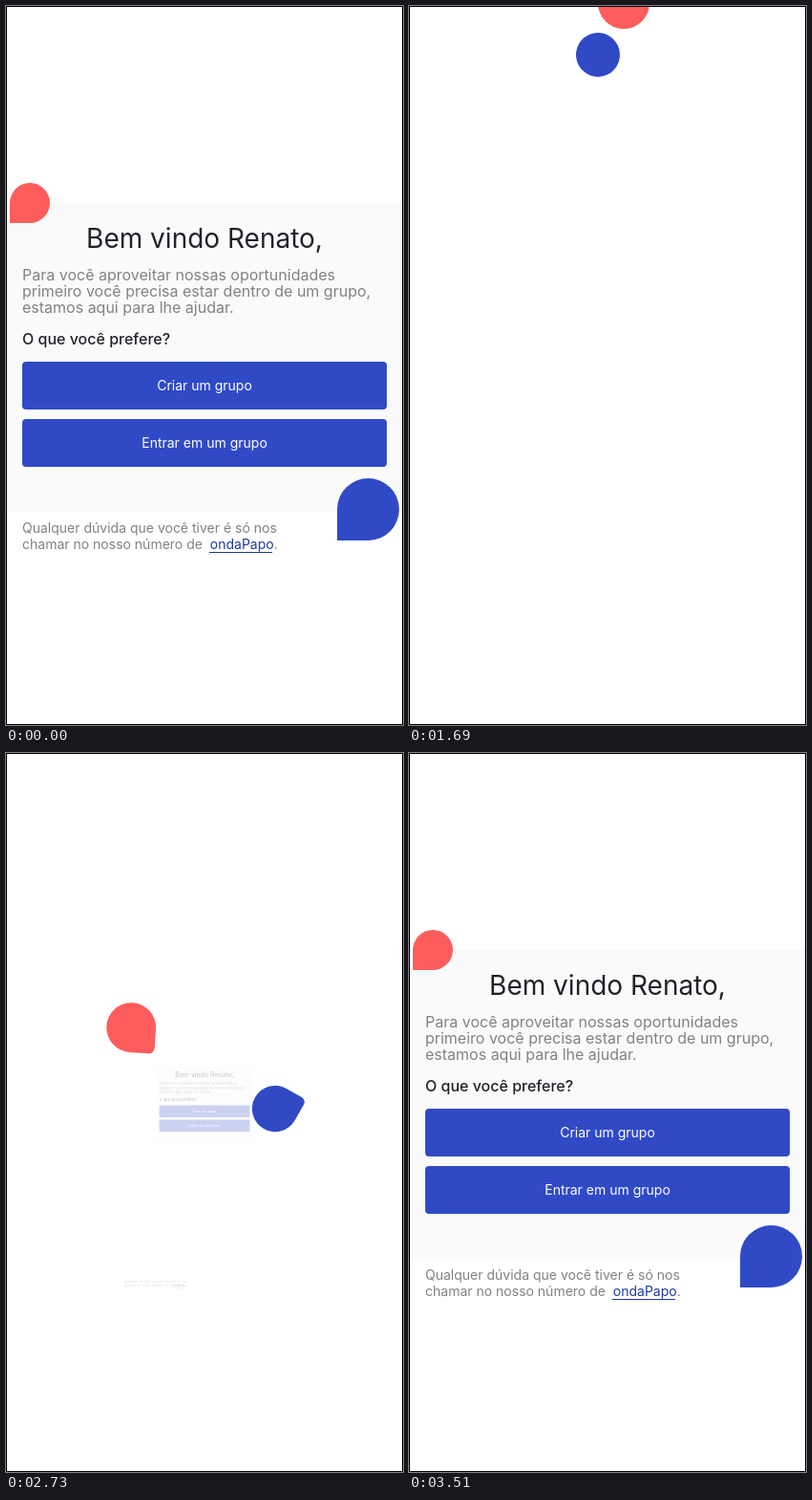
Write an HTML page that moves like this. It is 416 px wide and 752 px high and loops after 3.77 s.

```html
<!DOCTYPE html>
<html lang="pt-BR">
<head>
<meta charset="utf-8">
<title>Boas-vindas</title>
<style>
  html, body { margin: 0; width: 100%; height: 100%; overflow: hidden; background: #fff; }
  svg { display: block; width: 100vw; height: 100vh; }
  text { font: 400 16px Inter, Roboto, sans-serif; fill: #828282; }
  .title { font-size: 28px; fill: #232129; text-anchor: middle; }
  .ask { font-weight: 500; fill: #232129; }
  .label { font-size: 14px; fill: #fff; text-anchor: middle; }
  .note { font-size: 14px; }
  .link { fill: #1c3a9e; }
  .blue { fill: #304ac6; }
  .red { fill: #fd5d5c; }
</style>
</head>
<body>
<svg viewBox="0 0 416 752">
  <g id="card">
    <rect x="1" y="206" width="414" height="323" fill="#fafafa"/>
    <text class="title" x="208" y="253">Bem vindo Renato,</text>
    <text x="17" y="287">Para você aproveitar nossas oportunidades</text>
    <text x="17" y="304">primeiro você precisa estar dentro de um grupo,</text>
    <text x="17" y="321">estamos aqui para lhe ajudar.</text>
    <text class="ask" x="17" y="354">O que você prefere?</text>
    <rect class="blue" x="17" y="372" width="382" height="50" rx="4"/>
    <rect class="blue" x="17" y="432" width="382" height="50" rx="4"/>
    <text class="label" x="208" y="402">Criar um grupo</text>
    <text class="label" x="208" y="462">Entrar em um grupo</text>
  </g>
  <g id="note">
    <text class="note" x="17" y="551">Qualquer dúvida que você tiver é só nos</text>
    <text class="note" x="17" y="568">chamar no nosso número de&nbsp;&nbsp;<tspan class="link">ondaPapo</tspan>.</text>
    <rect class="link" x="213" y="571" width="66" height="1"/>
  </g>
  <path id="red" class="red"/>
  <path id="blue" class="blue"/>
  <rect x=".5" y=".5" width="415" height="751" fill="none" stroke="#000"/>
</svg>
<script>
const LOOP = 3770, STEP = 130, RESTART = 1430;
const SPREAD = { start: 2478, end: 3390 };
const REVEAL = { start: 2583, length: 820 };

// Each row: time, x, y, radius, corner angle, corner roundness
const red = {
  node: document.getElementById('red'),
  drop: [
    [1560, 212, -110, 27, 315, 1],
    [1690, 225, -3, 27, 315, 1],
    [1950, 262, 425, 25, 315, 1],
    [2080, 285, 645, 23, 315, 1],
    [2210, 165, 480, 21.8, 315, .72],
    [2478, 154, 304.5, 27, 108, .35]
  ],
  rest: [25, 206, 21, -225, 0],
  lift: 1
};
const blue = {
  node: document.getElementById('blue'),
  drop: [
    [1560, 196, -50, 23, -48, 1],
    [1690, 198, 51, 23, -48, 1],
    [1950, 280, 470, 28, -48, 1],
    [2080, 352, 622, 31, -48, 1],
    [2210, 234.5, 484.5, 32, -48, .72],
    [2478, 261, 331, 22.3, -48, .35]
  ],
  rest: [379.5, 526.5, 32.5, 135, 0],
  lift: 1.21
};
const card = { node: document.getElementById('card'), x: 208, y: 367.5 };
const note = { node: document.getElementById('note'), x: 159, y: 555 };

const clamp = v => Math.min(1, Math.max(0, v));
const mix = (a, b, p) => a + (b - a) * p;
const bezier = (a, b, s) => 3 * a * s * (1 - s) ** 2 + 3 * b * s * s * (1 - s) + s ** 3;

// cubic-bezier(.25, .1, .25, 1)
function ease(u) {
  let lo = 0, hi = 1;
  for (let i = 0; i < 24; i++) {
    const mid = (lo + hi) / 2;
    if (bezier(.25, .25, mid) < u) lo = mid; else hi = mid;
  }
  return bezier(.1, 1, lo);
}

// Smooth curve through the rows, at rest on both ends
function along(rows, t) {
  const last = rows.length - 1;
  let i = 0;
  while (i < last - 1 && t >= rows[i + 1][0]) i++;
  const a = rows[i], b = rows[i + 1], span = b[0] - a[0];
  const u = clamp((t - a[0]) / span);
  const slope = (k, c) => k === 0 || k === last ? 0 :
    (rows[k + 1][c] - rows[k - 1][c]) / (rows[k + 1][0] - rows[k - 1][0]);
  return [1, 2, 3, 4, 5].map(c => {
    if (c > 2) return mix(a[c], b[c], u);
    const h = u * u * (3 - 2 * u);
    return mix(a[c], b[c], h) +
      span * (slope(i, c) * u * (1 - u) ** 2 - slope(i + 1, c) * u * u * (1 - u));
  });
}

function pose(blob, t) {
  if (t < SPREAD.start) return along(blob.drop, t);
  const u = clamp((t - SPREAD.start) / (SPREAD.end - SPREAD.start));
  const p = (1 - Math.cos(Math.PI * u)) / 2;
  const from = blob.drop[blob.drop.length - 1].slice(1);
  const now = from.map((v, i) => mix(v, blob.rest[i], p));
  now[1] = mix(from[1], blob.rest[1], 1 - (1 - p) ** blob.lift);
  now[4] = from[4] * (1 - p) ** 2;
  return now;
}

// A circle whose one corner is pulled out towards a square
function drawBlob(blob, t) {
  const [x, y, r, angle, round] = pose(blob, t);
  const c = r * round, k = r - c;
  blob.node.setAttribute('d',
    `M${r} 0V${k}A${c} ${c} 0 0 1 ${k} ${r}H0A${r} ${r} 0 1 1 ${r} 0Z`);
  blob.node.setAttribute('transform', `translate(${x} ${y}) rotate(${angle - 45})`);
}

function drawGroup(group, p) {
  group.node.setAttribute('opacity', p);
  group.node.setAttribute('transform',
    `translate(${group.x} ${group.y}) scale(${p}) translate(${-group.x} ${-group.y})`);
}

function draw(time) {
  const held = Math.min(Math.floor(time / STEP) * STEP, LOOP - 2 * STEP);
  const t = held < RESTART ? LOOP : held;
  const u = clamp((t - REVEAL.start) / REVEAL.length);
  const p = u === 0 || u === 1 ? u : ease(u);
  drawGroup(card, p);
  drawGroup(note, p);
  drawBlob(red, t);
  drawBlob(blue, t);
}

const began = performance.now();
function tick() {
  draw((performance.now() - began) % LOOP);
  requestAnimationFrame(tick);
}
tick();
</script>
</body>
</html>
```
